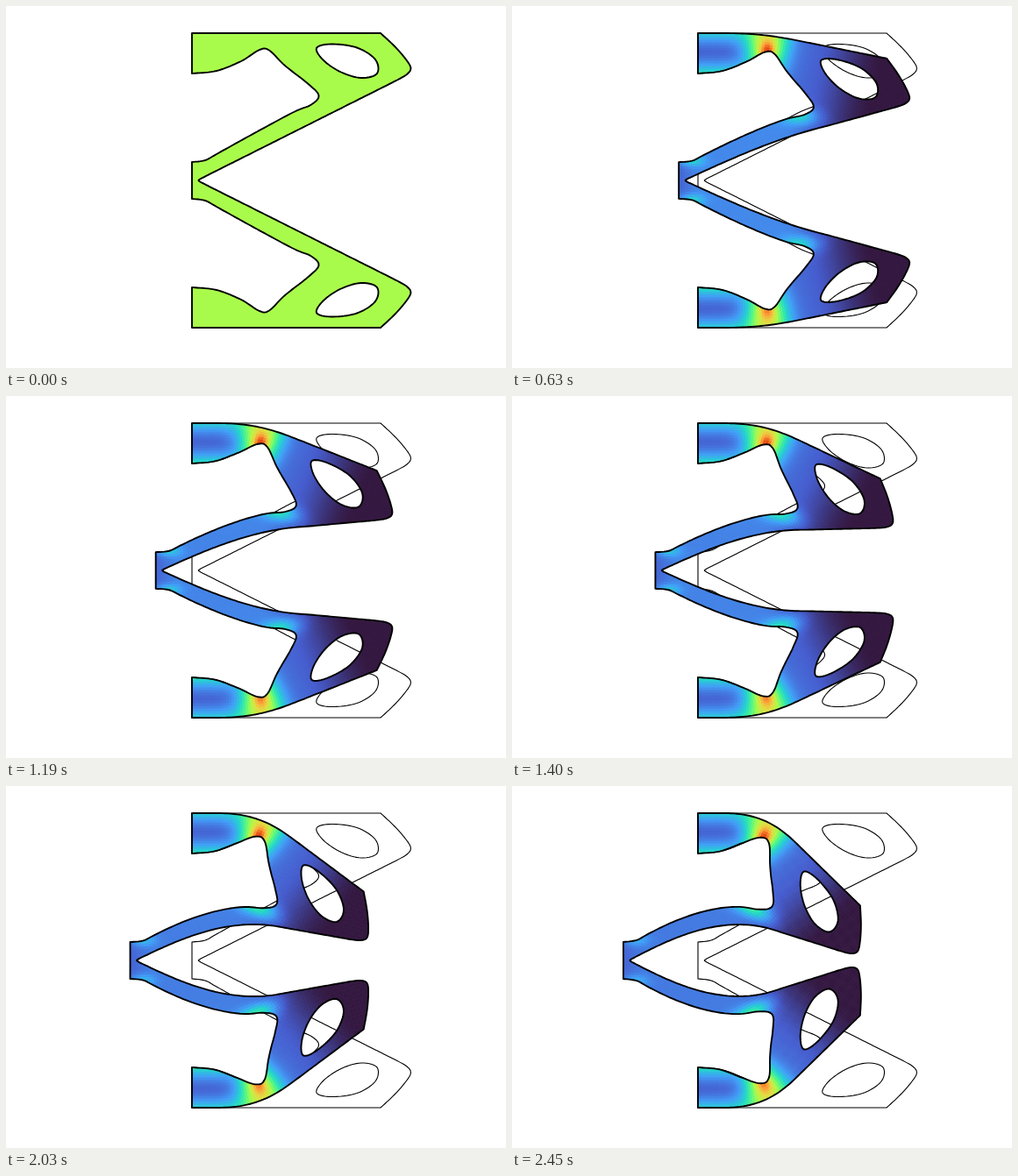
Recreate the animation shown at these times as an HTML page with a canvas. Size 570x413 px, loop 2520 ms.

```html
<!DOCTYPE html>
<html lang="en">
<head>
<meta charset="utf-8">
<style>
html, body { margin: 0; width: 100%; height: 100%; overflow: hidden; background: #fff; }
canvas { display: block; }
</style>
</head>
<body>
<canvas id="stage" width="570" height="413"></canvas>
<script>
const ctx = document.getElementById('stage').getContext('2d');
const STEP = 70, STEPS = 36, AXIS = 199, CELL = 3;
const MAX_TURN = 44.3 * Math.PI / 180, MAX_SHIFT = 85;
const PIVOT = [282.5, 46.7], TIP = [219, AXIS], LEG_ANGLE = -0.467;

const clamp = v => Math.min(1, Math.max(0, v));
const smooth = (a, b, v) => { const u = clamp((v - a) / (b - a)); return u * u * (3 - 2 * u); };
const mix = (a, b, u) => a + (b - a) * u;
const mixPoint = (p, q, u) => p.map((v, i) => mix(v, q[i], u));
const bump = (x, y, cx, cy, rx, ry) => Math.exp(-(((x - cx) / rx) ** 2) - ((y - cy) / ry) ** 2);

// Catmull-Rom curve through a few points, sampled about every 3 px.
function curve(points, closed) {
  const n = points.length, out = [];
  const at = i => points[closed ? (i + n) % n : Math.min(n - 1, Math.max(0, i))];
  for (let i = 0; i < (closed ? n : n - 1); i++) {
    const [a, b, c, d] = [at(i - 1), at(i), at(i + 1), at(i + 2)];
    const parts = Math.ceil(Math.hypot(c[0] - b[0], c[1] - b[1]) / 3);
    for (let j = 0; j < parts; j++) {
      const t = j / parts;
      out.push([0, 1].map(k => b[k] + t / 2 * (c[k] - a[k] +
        t * (2 * a[k] - 5 * b[k] + 4 * c[k] - d[k] + t * (3 * (b[k] - c[k]) + d[k] - a[k])))));
    }
  }
  if (!closed) out.push(at(n - 1));
  return out;
}

// Upper half of the gripper at rest; the lower half is its mirror image.
const body = [
  [212, AXIS],
  ...curve([[212, 178], [227, 176], [240, 169], [276, 149], [326, 122], [348, 112.5], [356.5, 102],
    [344, 88.5], [318, 68], [300, 50.5], [289, 50], [268, 63], [240, 74], [212, 77]]),
  ...curve([[212, 31], [427, 31]]),
  ...curve([[427, 31], [443, 46], [456, 61], [461.5, 71], [457, 78], [446, 84.5]]),
  ...curve([[446, 84.5], [222, 197]]),
  TIP
];
const opening = curve([[354, 48], [371, 43.5], [400, 47.5], [421, 61], [423, 77], [405, 82],
  [382, 75.5], [362, 62]], true);

function makePath(map) {
  const path = new Path2D();
  const trace = points => points.forEach((p, i) => path[i ? 'lineTo' : 'moveTo'](...map(p)));
  trace(body);
  trace(opening);
  path.closePath();
  return path;
}

// A beam bending along its length until it joins the rigid, rotated jaw.
function makeBeam(origin, angle, length, shift, turnAt, rigid) {
  const N = 48, ds = length / N, ex = Math.cos(angle), ey = Math.sin(angle);
  const line = [[origin[0] + shift, origin[1]]];
  for (let i = 0; i < N; i++) {
    const a = angle + turnAt((i + 0.5) / N), [x, y] = line[i];
    line.push([x + ds * Math.cos(a), y + ds * Math.sin(a)]);
  }
  const end = rigid([origin[0] + length * ex, origin[1] + length * ey]);
  const gap = [end[0] - line[N][0], end[1] - line[N][1]];
  return p => {
    const dx = p[0] - origin[0], dy = p[1] - origin[1];
    const s = dx * ex + dy * ey, n = dy * ex - dx * ey;
    if (s <= 0) return [p[0] + shift, p[1]];
    if (s >= length) return rigid(p);
    const u = s / length, i = Math.floor(u * N), a = angle + turnAt(u);
    const c = mixPoint(line[i], line[i + 1], u * N - i);
    return [c[0] + gap[0] * u - n * Math.sin(a), c[1] + gap[1] * u + n * Math.cos(a)];
  };
}

function makeDeformation(q) {
  const turn = MAX_TURN * q, cos = Math.cos(turn), sin = Math.sin(turn);
  const rigid = ([x, y]) => {
    const dx = x - PIVOT[0], dy = y - PIVOT[1];
    return [PIVOT[0] + dx * cos - dy * sin, PIVOT[1] + dx * sin + dy * cos];
  };
  const arm = makeBeam([232, 46], 0, 101, 0, u => turn * smooth(0, 1, u), rigid);
  const leg = makeBeam(TIP, LEG_ANGLE, 175, -MAX_SHIFT * q, u => turn * u ** 1.9, rigid);
  return p => mixPoint(arm(p), leg(p), clamp((p[1] - 97) / 12));
}

// Normalised stress at a rest position.
function stress(x, y, q, peak) {
  const jaw = 0.115 * (1 - smooth(335, 425, x));
  const leg = smooth(98, 116, y) * (1 - smooth(325, 365, x)) * smooth(210, 240, x);
  const bending = Math.min(1.1, Math.abs(y - 53) / 23) ** 1.7;
  const arm = (1 - smooth(98, 110, y)) * (1 - smooth(240, 300, x));
  return jaw + 0.2 * arm * bending + leg * mix(0.06, 0.03, q)
    + 0.47 * bump(x, y, 291, 42, 23, 45)
    + peak * bump(x, y, 292, 49, 8, 10)
    + mix(0.15, 0.25, q) * bump(x, y, 342, 114, 22, 11)
    + mix(0.17, 0.1, q) * bump(x, y, 226, 176, 14, 7);
}

const PALETTE = ['#341840', '#465ccd', '#429ef8', '#22d6cc', '#50f688', '#a9fb4b',
  '#e2dc42', '#fca53a', '#ee5d1c', '#c2280a', '#7a0403']
  .map(hex => [1, 3, 5].map(i => parseInt(hex.slice(i, i + 2), 16)));
function heat(value) {
  const v = clamp(value) * (PALETTE.length - 1), i = Math.min(PALETTE.length - 2, Math.floor(v));
  return `rgb(${mixPoint(PALETTE[i], PALETTE[i + 1], v - i).map(Math.round)})`;
}

const restPath = makePath(p => p);
const cells = [];
ctx.lineWidth = 12;
for (let y = 27; y < AXIS; y += CELL)
  for (let x = 207; x < 468; x += CELL) {
    const cx = x + CELL / 2, cy = Math.min(y + CELL / 2, AXIS - 2);
    if (ctx.isPointInPath(restPath, cx, cy, 'evenodd') || ctx.isPointInStroke(restPath, cx, cy))
      cells.push([x, y]);
  }

function paintStress(map, q, peak) {
  ctx.lineWidth = 1;
  for (const [x, y] of cells) {
    ctx.fillStyle = ctx.strokeStyle = heat(stress(x + CELL / 2, y + CELL / 2, q, peak));
    ctx.beginPath();
    for (const [i, j] of [[0, 0], [1, 0], [1, 1], [0, 1]])
      ctx.lineTo(...map([x + i * CELL, y + j * CELL]));
    ctx.closePath();
    ctx.fill();
    ctx.stroke();
  }
}

function outline(path, width) {
  ctx.strokeStyle = '#000';
  ctx.lineWidth = width;
  ctx.stroke(path);
}

function draw(step) {
  const q = step / (STEPS - 1), map = makeDeformation(q), path = makePath(map);
  ctx.setTransform(1, 0, 0, 1, 0, 0);
  ctx.fillStyle = '#fff';
  ctx.fillRect(0, 0, 570, 413);
  ctx.lineJoin = 'round';
  for (const side of [1, -1]) {
    ctx.setTransform(1, 0, 0, side, 0, side > 0 ? 0 : 2 * AXIS);
    if (step) {
      outline(restPath, 1.1);
      ctx.save();
      ctx.clip(path, 'evenodd');
      paintStress(map, q, side > 0 ? 0.27 : 0.18);
      ctx.restore();
    } else {
      ctx.fillStyle = heat(0.5);
      ctx.fill(path, 'evenodd');
    }
    outline(path, 1.9);
  }
}

let shown = -1;
function tick() {
  const step = Math.floor(performance.now() / STEP) % STEPS;
  if (step !== shown) draw(shown = step);
  requestAnimationFrame(tick);
}
tick();
</script>
</body>
</html>
```
